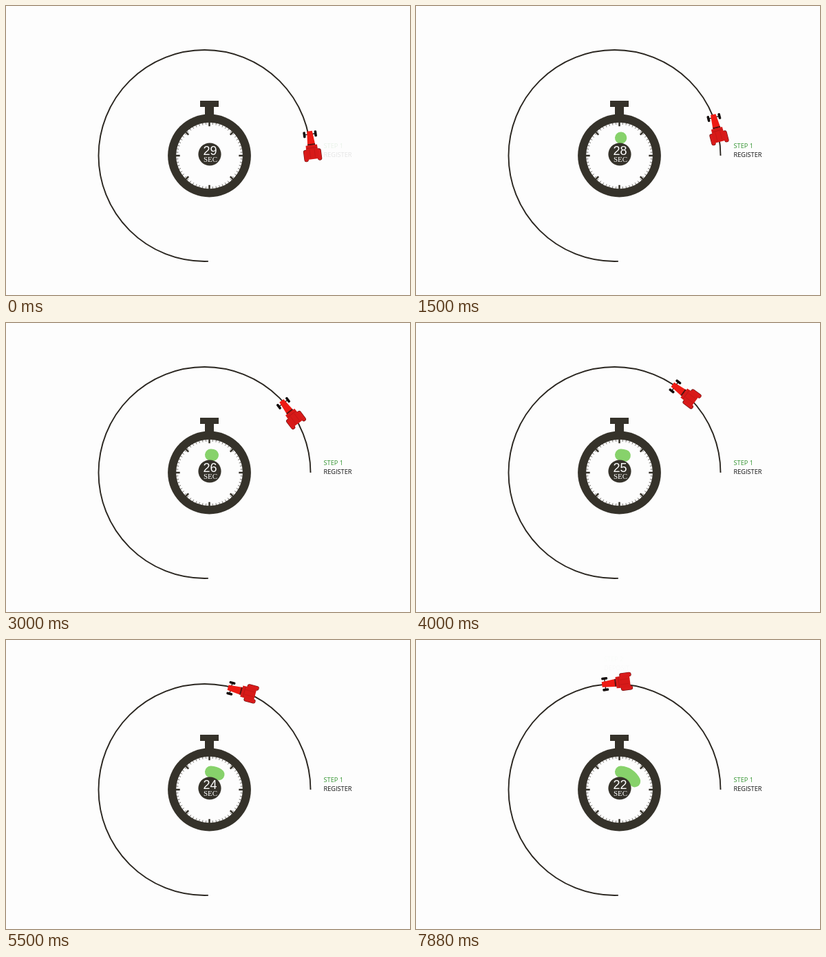
Animation of 587 by 421 pixels, one loop 8000 ms. Source, as an HTML page with a canvas:

```html
<!DOCTYPE html>
<html lang="en">
<head>
<meta charset="utf-8">
<title>Stopwatch lap</title>
<style>
html, body { margin: 0; width: 100%; height: 100%; overflow: hidden; background: #fdfdfd; }
canvas { display: block; }
</style>
</head>
<body>
<canvas id="stage" width="587" height="421"></canvas>
<script>
const ctx = document.getElementById('stage').getContext('2d');
const LOOP = 8000, STEP = 125;
const RAD = Math.PI / 180;
const DARK = '#35322a', GREEN = '#87d26b', BLACK = '#140d0c';
const LABEL = '9.2px "Open Sans", "Noto Sans", sans-serif';
const track = { x: 288.5, y: 218, r: 154 };
const watch = { x: 295.5, y: 218 };
const hub = { x: 296, y: 216 };

// angle on the track, distance from its centre, heading (degrees)
const path = [
  [5.1, 156, 7.5], [14.7, 153.6, 14.5], [34.9, 152.4, 37], [48.3, 153.8, 53],
  [69, 153.4, 75], [84.3, 154.6, 90], [88.7, 156, 97.5]
];

function along(angle, col) {
  let i = 1;
  while (i < path.length - 1 && angle > path[i][0]) i++;
  const a = path[i - 1], b = path[i];
  return a[col] + (b[col] - a[col]) * (angle - a[0]) / (b[0] - a[0]);
}

// speed up, cruise, slow down
function carAngle(s) {
  const v = 13.6, up = 1.62, brake = 5.81;
  const run = s < up ? v * s * s / (2 * up) : v * (s - up / 2);
  return 5.1 + run - (s > brake ? 2.93 * (s - brake) ** 2 : 0);
}

function disc(x, y, r, color) {
  ctx.fillStyle = color;
  ctx.beginPath();
  ctx.arc(x, y, r, 0, 2 * Math.PI);
  ctx.fill();
}

function rect(x, y, w, h, color) {
  ctx.fillStyle = color;
  ctx.fillRect(x, y, w, h);
}

function line(x1, y1, x2, y2, width, color) {
  ctx.strokeStyle = color;
  ctx.lineWidth = width;
  ctx.beginPath();
  ctx.moveTo(x1, y1);
  ctx.lineTo(x2, y2);
  ctx.stroke();
}

function poly(points, color) {
  ctx.fillStyle = color;
  ctx.beginPath();
  points.forEach(([x, y]) => ctx.lineTo(x, y));
  ctx.closePath();
  ctx.fill();
}

function pill(x, y, w, h, r, color) {
  ctx.fillStyle = color;
  ctx.beginPath();
  ctx.roundRect(x, y, w, h, r);
  ctx.fill();
}

function text(str, x, y, font, color, align = 'left') {
  ctx.font = font;
  ctx.textAlign = align;
  ctx.fillStyle = color;
  ctx.fillText(str, x, y);
}

function drawTrack() {
  ctx.strokeStyle = '#2a2620';
  ctx.lineWidth = 1.9;
  ctx.beginPath();
  ctx.arc(track.x, track.y, track.r, 0, 88 * RAD, true);
  ctx.stroke();
}

function drawWatch() {
  rect(282, 138, 27, 9, DARK);
  rect(289, 146, 13, 15, DARK);
  disc(watch.x, watch.y, 60.4, DARK);
  disc(watch.x, watch.y, 48.3, '#fdfdfd');
  for (let i = 0; i < 120; i++) {
    const major = i % 15 === 0;
    if (!major && i % 2) continue;
    const a = i * 3 * RAD, c = Math.cos(a), s = Math.sin(a);
    const inner = major ? 42.8 : 45.4;
    line(watch.x + c * inner, watch.y + s * inner, watch.x + c * 49, watch.y + s * 49,
      major ? 2.5 : 0.7, DARK);
  }
}

function drawDial(s) {
  if (s >= 1) {
    const sweep = 2.1 * (s - 1) ** 1.75 + 0.2;
    ctx.strokeStyle = GREEN;
    ctx.lineWidth = 17;
    ctx.lineCap = 'round';
    ctx.beginPath();
    ctx.arc(hub.x, hub.y, 24, -86.5 * RAD, (sweep - 86.5) * RAD);
    ctx.stroke();
    ctx.lineCap = 'butt';
  }
  disc(hub.x, hub.y, 16.6, DARK);
  text(29 - Math.floor(s), 296.5, 217, '18px "Liberation Sans", Arial, sans-serif', '#fff', 'center');
  text('SEC', 297, 226.6, '11px "Liberation Serif", "Times New Roman", serif', '#fff', 'center');
}

function drawCar(s) {
  const angle = carAngle(s), r = along(angle, 1);
  ctx.save();
  ctx.translate(track.x + r * Math.cos(angle * RAD), track.y - r * Math.sin(angle * RAD));
  ctx.rotate(-along(angle, 2) * RAD);
  line(-8, -17.5, 8, -17.5, 1.3, BLACK);
  for (const side of [-1, 1]) pill(side * 8.2 - 1.8, -22, 3.6, 9, 1.5, BLACK);
  poly([[-3.8, -22], [3.8, -22], [5.5, -3], [-5.5, -3]], '#ee1b14');
  rect(-5.6, -3.4, 11.2, 2.4, '#57100e');
  for (const side of [-1, 1]) {
    pill(side * 9.8 - 3.2, 4.5, 6.4, 17.5, 3, '#6d1110');
    pill(side * 9.8 - 2.6, 5.4, 5.2, 16, 2.5, '#d91b1b');
  }
  poly([[-8.2, -1.5], [8.2, -1.5], [8.6, 6], [8, 19], [-8, 19], [-8.6, 6]], '#d71a18');
  line(-7.5, 2.6, 7.5, 2.6, 0.6, '#a51414');
  line(-3.5, 4, -3.5, 17, 0.5, '#b51616');
  line(3.5, 4, 3.5, 17, 0.5, '#b51616');
  ctx.restore();
}

function drawLabel(step, title, x, y, alpha) {
  ctx.globalAlpha = Math.max(0, Math.min(1, alpha));
  text(step, x, y, LABEL, '#2f922d');
  text(title, x, y + 12.5, LABEL, '#0c0c0c');
  ctx.globalAlpha = 1;
}

function draw(ms) {
  const s = Math.floor(ms / STEP) * STEP / 1000;
  rect(0, 0, 587, 421, '#fdfdfd');
  drawTrack();
  drawWatch();
  drawDial(s);
  drawLabel('STEP 1', 'REGISTER', 461.5, 207, 0.1 + s);
  if (s > 7.8) drawLabel('STEP 2', 'DEPOSIT', 273, 31, 0.02);
  drawCar(s);
}

const start = performance.now();
function tick() {
  draw((performance.now() - start) % LOOP);
  requestAnimationFrame(tick);
}
tick();
</script>
</body>
</html>
```
